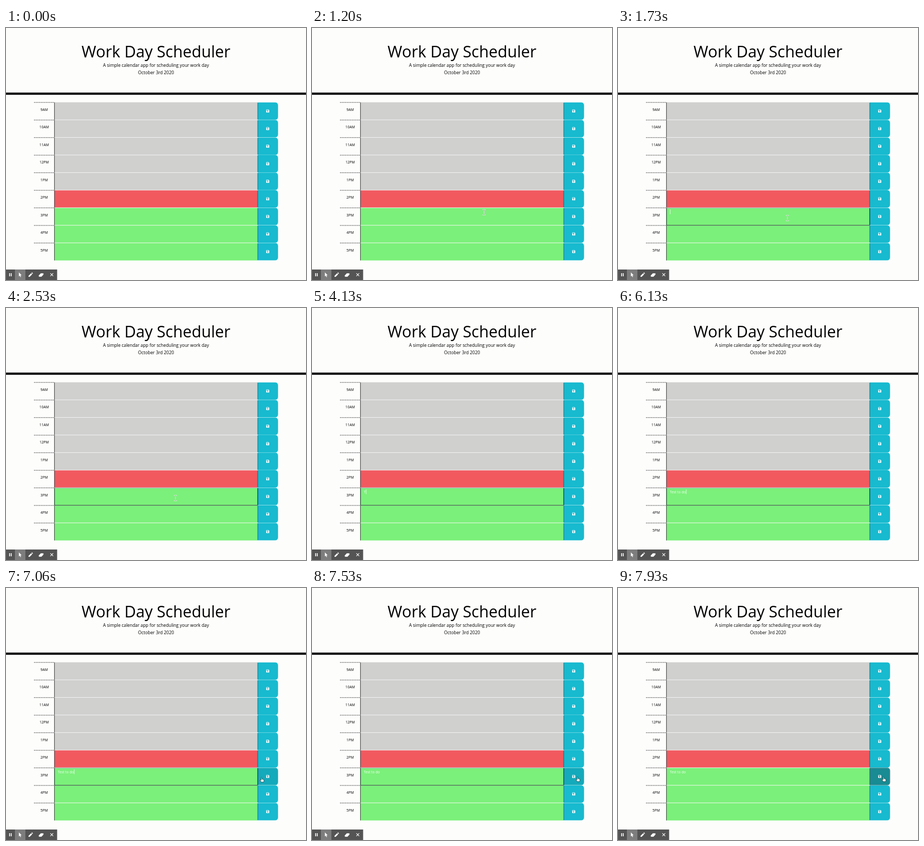
An HTML page that plays this animation: 572x480 px, repeating every 8 s.

```html
<!DOCTYPE html>
<html lang="en">
<head>
<meta charset="utf-8">
<title>Work Day Scheduler</title>
<style>
  html, body { margin: 0; width: 100%; height: 100%; overflow: hidden; background: #fdfdfc; }
  svg { display: block; width: 572px; height: 480px; }
  text { font-family: "Open Sans", sans-serif; fill: #000; white-space: pre; }
  .mid { text-anchor: middle; }
  .hour { font-size: 6.7px; }
  .lead { font-size: 8.38px; }
</style>
</head>
<body>
<svg id="stage" viewBox="0 0 572 480">
  <defs>
    <path id="save" fill="#fff" fill-rule="evenodd" d="M-2.9-2.2Q-2.9-2.9-2.2-2.9H1.6L2.9-1.6V2.2Q2.9 2.9 2.2 2.9H-2.2Q-2.9 2.9-2.9 2.2ZM-2.1-2.1V-.5H1.3V-2.1ZM0 .2A.9.9 0 1 0 .01.2Z"/>
  </defs>
  <text class="mid" x="286" y="56.4" font-size="30.2">Work Day Scheduler</text>
  <text class="mid lead" x="286" y="74">A simple calendar app for scheduling your work day</text>
  <text class="mid lead" x="286" y="88.4">October 3rd 2020</text>
  <rect y="123" width="572" height="4.2"/>
  <g id="rows"></g>

  <g id="focus">
    <path d="M92.5 342.9H480" stroke="#a3a8b4" fill="none"/>
    <path d="M92.6 343V375.8H480V343" stroke="#1d3b2c" fill="none"/>
  </g>
  <text id="entry" class="hour" x="98.8" y="352.8" style="fill:#f4fff4"></text>
  <rect id="caret" y="345.6" width=".8" height="9" fill="#f4fff4"/>

  <g id="toolbar">
    <rect y="460" width="97.5" height="20" fill="#545454"/>
    <rect x="17" y="460" width="20" height="20" fill="#7d7d7d"/>
    <g fill="#fff">
      <path d="M6 467h1.6v6H6ZM9.2 467h1.6v6H9.2Z"/>
      <path d="M24.6 465.6V473.2L26.3 471.7L27.5 474.4L28.7 473.9L27.5 471.3L29.8 471.1Z"/>
      <path d="M43 474V472L47.8 467.2L49.8 469.2L45 474ZM48.4 466.6L49.2 465.8Q49.6 465.5 50 465.8L51.2 467Q51.5 467.4 51.2 467.8L50.4 468.6Z"/>
      <path d="M62.6 471.2L66.4 467.2H71.4V469.8L67.6 473.8H62.6Z"/>
    </g>
    <path d="M84.6 467.2L90 472.6M90 467.2L84.6 472.6" stroke="#fff" stroke-width="1.1"/>
  </g>

  <g id="beam" fill="none" stroke-linecap="round">
    <path d="M-1.9-5Q0-5 0-3.8Q0-5 1.9-5M0-4V4M-1.9 5Q0 5 0 3.8Q0 5 1.9 5" stroke="#fff" stroke-opacity=".75" stroke-width="1.9"/>
    <path d="M-1.9-5Q0-5 0-3.8Q0-5 1.9-5M0-4V4M-1.9 5Q0 5 0 3.8Q0 5 1.9 5" stroke="#8b9a8b" stroke-width=".7"/>
  </g>
  <path id="hand" fill="#fff" stroke="#222" stroke-width=".7" stroke-linejoin="round"
    d="M-1.6 1V-3.6Q-1.6-4.5-.8-4.5T0-3.6V-.8Q.9-1.4 1.4-.5Q2.2-1 2.7-.1Q3.8-.4 3.8.7V2.2Q3.8 3.4 3 4.8H-1.2Q-2.4 3-3.5 1.6Q-3.9.7-3.1.5Q-2.4.4-1.6 1.4Z"/>
</svg>

<script>
const LOOP = 8000, TOP = 141.5, PITCH = 33.47, ACTIVE = 6;
const FOCUS = 1660, PRESS = 7600, HOVER = 6860;
const HOURS = ["9AM", "10AM", "11AM", "12PM", "1PM", "2PM", "3PM", "4PM", "5PM"];
const WORDS = "Test to do";
const KEYS = [4130, 4330, 4530, 4730, 4930, 5200, 5330, 5530, 5730, 5860];
// time, x, y
const PATH = [
  [800, 333, 340], [1200, 328, 351], [1530, 323, 362], [6260, 323, 362],
  [HOVER, 481, 366], [7060, 488, 365], [7530, 507, 364], [LOOP, 507, 364]
];
const $ = id => document.getElementById(id);
const show = (el, on) => el.setAttribute("visibility", on ? "visible" : "hidden");
const tone = i => i < 5 ? "#d0d0cf" : i === 5 ? "#f1595f" : "#7bf07a";

function row(hour, i) {
  const y = TOP + i * PITCH, h = PITCH;
  return `
    <path d="M53.5 ${y + .3}H92" stroke="#222" stroke-width=".9" stroke-dasharray="2 1.2"/>
    <text class="mid hour" x="72.8" y="${y + 16.3}">${hour}</text>
    <rect x="92.5" y="${y}" width="387.5" height="${h}" fill="${tone(i)}"/>
    ${i ? `<path d="M93 ${y}H480" stroke="#f8f8f6" stroke-width=".9"/>` : ""}
    <path d="M92.4 ${y}v${h}" stroke="#222" stroke-width=".9"/>
    <path class="btn" d="M480.3 ${y + .2}H512.9Q518.7 ${y + .2} 518.7 ${y + 6}V${y + h - 6}Q518.7 ${y + h - .2} 512.9 ${y + h - .2}H480.3Z" fill="#17bacf"/>
    <path d="M480.1 ${y + .8}v${h - 1.4}" stroke="#16434c" stroke-width=".9"/>
    <use href="#save" x="499" y="${y + 16.6}"/>`;
}

$("rows").innerHTML = HOURS.map(row).join("");
const button = document.querySelectorAll(".btn")[ACTIVE];
const pen = document.createElement("canvas").getContext("2d");

function textWidth(s) {
  pen.font = '67px "Open Sans", sans-serif';
  return pen.measureText(s).width / 10;
}

function mix(a, b, k) {
  k = Math.max(0, Math.min(1, k));
  return `rgb(${a.map((v, i) => Math.round(v + (b[i] - v) * k))})`;
}

function pointer(t) {
  const i = PATH.findIndex(p => p[0] > t);
  const [t0, x0, y0] = PATH[i - 1], [t1, x1, y1] = PATH[i];
  const u = (t - t0) / (t1 - t0), k = u * u * (3 - 2 * u);
  return [x0 + (x1 - x0) * k, y0 + (y1 - y0) * k];
}

function draw(t) {
  const typed = KEYS.filter(k => k <= t).length;
  const focused = t >= FOCUS && t < PRESS;
  const last = typed ? KEYS[typed - 1] : FOCUS;
  const text = WORDS.slice(0, typed);
  $("entry").textContent = text;
  $("caret").setAttribute("x", 99 + textWidth(text));
  show($("caret"), focused && (t - last) % 1000 < 500);
  show($("focus"), focused);

  const over = t >= HOVER, moving = t >= PATH[0][0];
  const typing = t >= KEYS[0] && t < 6260;
  if (moving) {
    const [x, y] = pointer(t);
    for (const id of ["beam", "hand"]) $(id).setAttribute("transform", `translate(${x} ${y})`);
  }
  show($("beam"), moving && !typing && !over);
  show($("hand"), over);

  const base = [23, 186, 207], hover = [20, 170, 187], down = [24, 139, 147];
  button.setAttribute("fill", t < PRESS
    ? mix(base, hover, (t - HOVER) / 150)
    : mix(hover, down, (t - PRESS) / 150));
  button.setAttribute("stroke", t < PRESS ? "none" : "rgba(125,150,152,.55)");
}

function tick(now) {
  draw(now % LOOP);
  requestAnimationFrame(tick);
}
draw(0);
requestAnimationFrame(tick);
</script>
</body>
</html>
```
